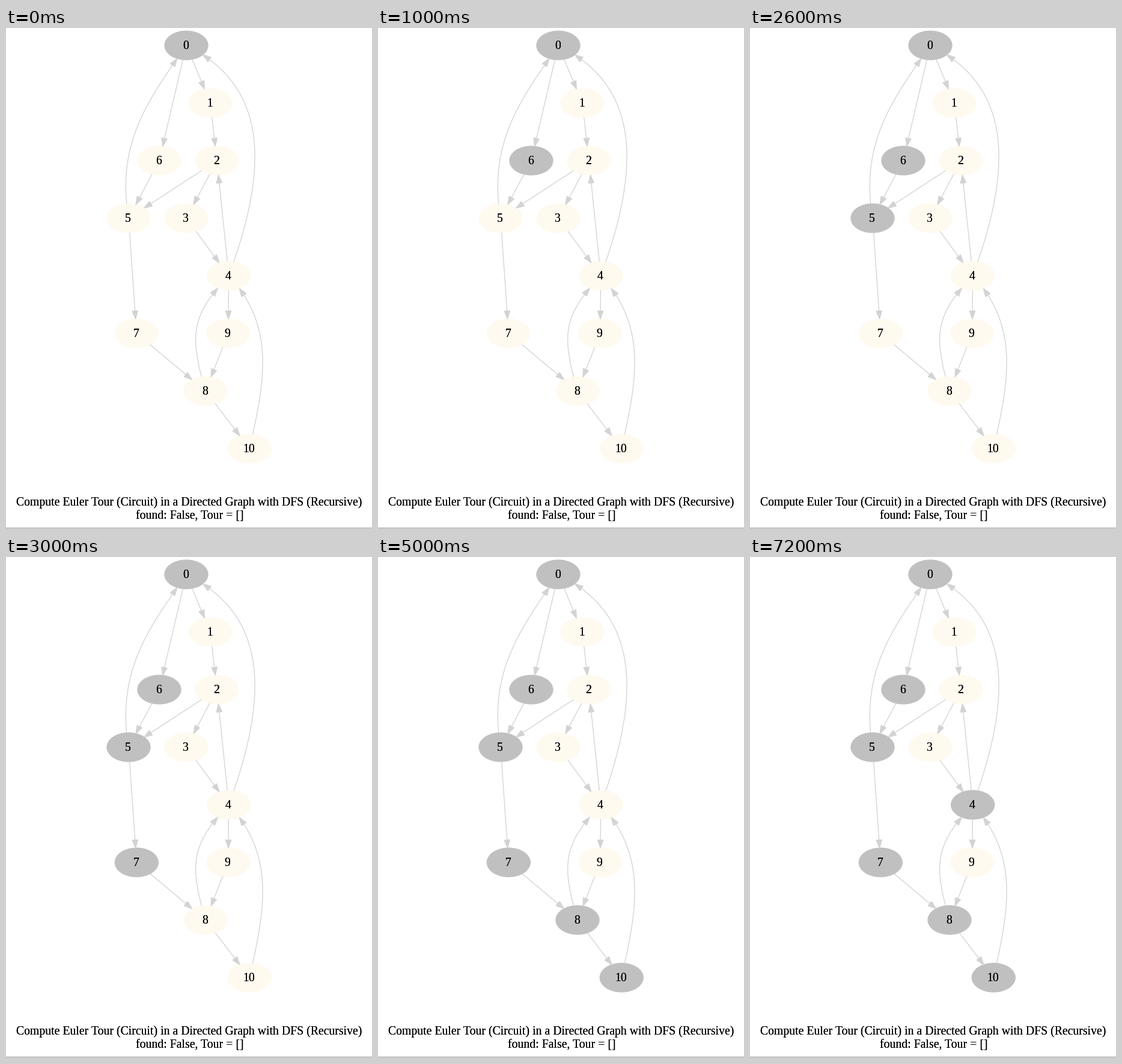
A matplotlib script that plays this animation: 609 by 835 pixels, repeating every 8000 ms.

```python
import numpy as np
import matplotlib.pyplot as plt
from matplotlib.animation import FuncAnimation
from matplotlib.patches import Ellipse, Polygon, Rectangle

W, H, DPI = 609, 835, 64
PT = 72 / DPI  # points per pixel
LINE = 1.3 * PT
RADII = np.array([36, 24])
EDGE, IDLE, VISITED = "#d3d3d3", "#fffaf0", "#c0c0c0"

NODE_X = [300, 340, 351, 300, 370.7, 204, 255, 217.3, 332, 369.7, 405.3]
RANKS = [[0], [1], [6, 2], [5, 3], [4], [7, 9], [8], [10]]
CENTERS = {node: np.array([NODE_X[node], 29 + 96 * rank])
           for rank, row in enumerate(RANKS) for node in row}
SUCCESSORS = {0: [6, 1], 1: [2], 2: [5, 3], 3: [4], 4: [2, 0, 9], 5: [0, 7],
              6: [5], 7: [8], 8: [4, 10], 9: [8], 10: [4]}
# control points of the edges that run back up the graph in a bow
BOWS = {(4, 0): [(440, 225), (433, 95)], (5, 0): [(182.5, 190), (239, 117)],
        (8, 4): [(304, 510), (309, 478)], (10, 4): [(428, 597), (452, 500)]}
VISIT_ORDER = [0, 6, 5, 7, 8, 10, 4]

fig = plt.figure(figsize=(W / DPI, H / DPI), dpi=DPI, facecolor="white")
ax = fig.add_axes([0, 0, 1, 1])
ax.set(xlim=(0, W), ylim=(H, 0))
ax.axis("off")


def write(x, y, text):
    for _ in range(2):  # a second pass firms up the thin strokes
        ax.text(x, y, text, family="Liberation Serif", size=19.75 * PT,
                color="black", ha="center", va="baseline", zorder=4)


def bezier(p0, p1, p2, p3):
    t = np.linspace(0, 1, 1500)[:, None]
    s = 1 - t
    return (s**3 * p0 + 3 * s**2 * t * np.array(p1)
            + 3 * s * t**2 * np.array(p2) + t**3 * p3)


def outside(points, center):
    return np.hypot(*((points - center) / RADII).T) >= 1


def draw_edge(tail, head):
    start, end = CENTERS[tail], CENTERS[head]
    step = (end - start) / 3
    controls = BOWS.get((tail, head), [start + step, end - step])
    points = bezier(start, *controls, end)
    points = points[outside(points, start) & outside(points, end)]
    tip = points[-1]
    shaft = points[np.hypot(*(points - tip).T) >= 13.3]
    base = shaft[-1]
    along = (tip - base) / np.hypot(*(tip - base))
    side = 4.67 * np.array([-along[1], along[0]])
    ax.plot(*shaft.T, color=EDGE, lw=LINE, solid_capstyle="butt", zorder=2)
    ax.add_patch(Polygon([base + side, tip, base - side], facecolor=EDGE,
                         edgecolor=EDGE, lw=LINE, joinstyle="miter", zorder=3))


def draw_node(node):
    x, y = CENTERS[node]
    write(x - 1, y + 6, str(node))
    return ax.add_patch(Ellipse((x, y), *(2 * RADII), lw=LINE, zorder=1))


ovals = {node: draw_node(node) for node in CENTERS}
for tail, heads in SUCCESSORS.items():
    for head in heads:
        draw_edge(tail, head)

write(304.5, 796, "Compute Euler Tour (Circuit) in a Directed Graph "
                  "with DFS (Recursive)")
write(306, 818, "found: False, Tour = []")
ax.add_patch(Rectangle((0, 833), W, 1, facecolor="#808080", lw=0))


def update(step):
    visited = VISIT_ORDER[:step + 1]
    for node, oval in ovals.items():
        oval.set_color(VISITED if node in visited else IDLE)
    return list(ovals.values())


anim = FuncAnimation(fig, update, frames=8, interval=1000, repeat=True,
                     repeat_delay=0, blit=False)
plt.show()
```
